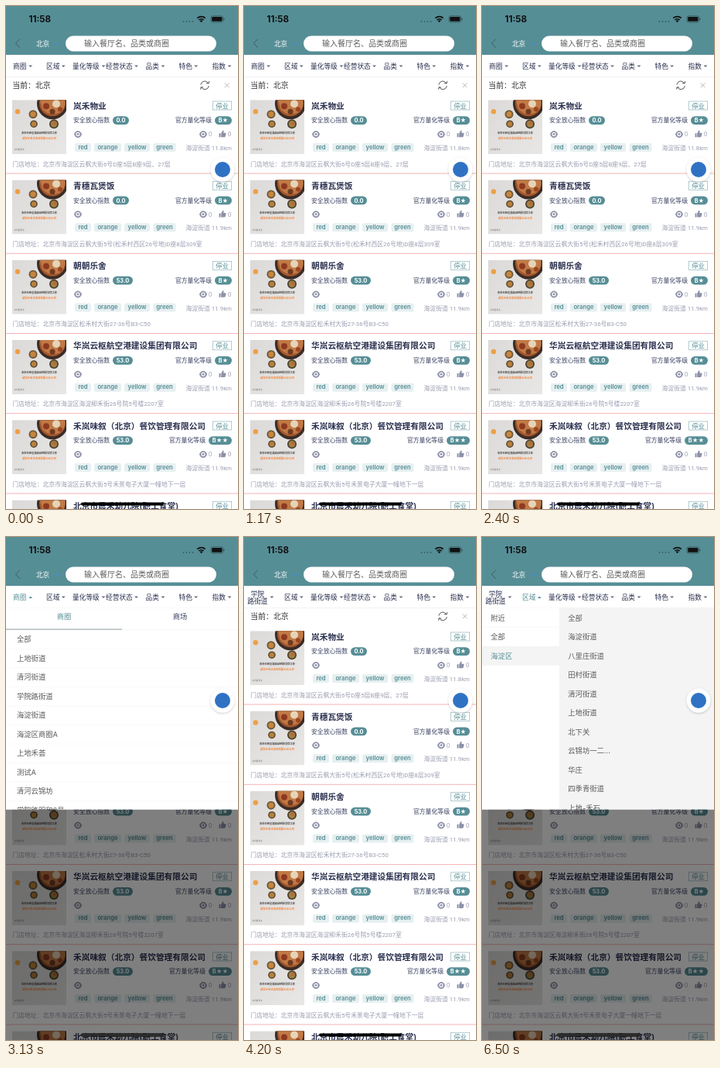
These frames come from a looping animation (300 by 649 pixels, 8 s). An HTML page:

```html
<!DOCTYPE html>
<html lang="zh-CN">
<head>
<meta charset="utf-8">
<title>餐厅列表</title>
<style>
  html, body { margin: 0; width: 100%; height: 100%; overflow: hidden; background: #fff; }
  #stage { display: block; width: 300px; height: 649px; }
  text { font-family: Inter, "Noto Sans CJK SC", "Noto Sans CJK", sans-serif; white-space: pre; }
  .r { font-family: Roboto, "Noto Sans CJK SC", "Noto Sans CJK", sans-serif; }
  .k { animation: 8s step-end infinite; opacity: 0; }
  .area { animation-name: area; }
  .first { animation-name: first; }
  .picked { animation-name: picked; }
  .before { animation-name: before; }
  .region { animation-name: region; }
  .street { animation-name: street; }
  .mask { animation-name: mask; }
  @keyframes first { 0% { opacity: 1 } 39.125%, 100% { opacity: 0 } }
  @keyframes area { 0% { opacity: 0 } 39.125% { opacity: 1 } 50.375%, 100% { opacity: 0 } }
  @keyframes picked { 0% { opacity: 0 } 50.375%, 100% { opacity: 1 } }
  @keyframes before { 0% { opacity: 1 } 70.375%, 100% { opacity: 0 } }
  @keyframes region { 0% { opacity: 0 } 70.375%, 100% { opacity: 1 } }
  @keyframes street { 0% { opacity: 0 } 79.125%, 100% { opacity: 1 } }
  @keyframes mask {
    0% { opacity: 0 } 39.125% { opacity: 1 } 50.375% { opacity: 0 } 70.375%, 100% { opacity: 1 }
  }
</style>
</head>
<body>
<svg id="stage" viewBox="0 0 300 649"></svg>
<script>
const TEAL = '#568e96', NAVY = '#2b3150', LABEL = '#3c4263', MUTED = '#9a9db0', ITEM = '#5a5a5a';

// Text placed by its vertical centre.
const text = (x, y, size, fill, str, o = {}) =>
  `<text x="${x}" y="${(y + size * .37).toFixed(2)}" font-size="${size}" fill="${fill}"` +
  ` font-weight="${o.w || 400}" text-anchor="${o.a || 'start'}" class="${o.c || ''}">${str}</text>`;
const rect = (x, y, w, h, fill, r = 0, more = '') =>
  `<rect x="${x}" y="${y}" width="${w}" height="${h}" rx="${r}" fill="${fill}" ${more}/>`;
const circle = (x, y, r, fill, more = '') => `<circle cx="${x}" cy="${y}" r="${r}" fill="${fill}" ${more}/>`;
const path = (d, fill, more = '') => `<path d="${d}" fill="${fill}" ${more}/>`;
const line = (d, stroke, w) => path(d, 'none', `stroke="${stroke}" stroke-width="${w}" stroke-linecap="round"`);
const group = (cls, ...kids) => `<g class="${cls}">${kids.join('')}</g>`;
const move = (x, y, body) => `<g transform="translate(${x} ${y})">${body}</g>`;
const caret = (x, y, fill, up) => path(`M${x - 2.4} ${y + (up ? 1.2 : -1.2)}h4.8l-2.4 ${up ? -2.5 : 2.5}z`, fill);

const eye = fill =>
  path('M-5 0C-3-6 3-6 5 0C3 6-3 6-5 0Z', fill) + circle(0, 0, 2.6, '#fff') + circle(0, 0, 1.4, fill);
const thumb = path('M-4.5-.8h2v5h-2zM-1.8-.8L.4-4.5q1.6 0 1.2 1.7l-.4 1.6h2.6q.9.2.7 1.2l-.9 3.4q-.3.8-1.1.8h-4.3z', '#8d91a8');

const photo = `<svg width="70" height="70">` +
  rect(0, 0, 70, 70, 'url(#paper)') +
  circle(52, 5, 20, '#3a2c26') + circle(52, 4, 17, '#a4562c') +
  path('M36 0h32q2 12-8 17q-14 4-21-6z', '#c07a45') +
  circle(44, 8, 4, '#8e3a22') + circle(57, 5, 5, '#e6d3b8') + circle(52, 15, 3.5, '#6f3a20') +
  circle(62, 12, 3, '#9b4526') +
  circle(27, 18.5, 5.5, '#6b5a3a') + circle(27, 18.5, 3.6, '#c7853c') +
  circle(54, 31, 6, '#4d4232') + circle(54, 31, 4.2, '#a1823f') + circle(55, 30, 2, '#c5603a') +
  circle(28, 31, 4.8, '#584a35') + circle(28, 31, 3.2, '#b98038') +
  circle(7, 15, 3.2, '#eda045') +
  text(35, 42.2, 3.3, '#444', '本市已经全面启动明厨餐饮工作', { w: 700, a: 'middle' }) +
  text(35, 49.3, 3.4, '#ef8238', '请餐厅业主实现后厨公众公开', { w: 700, a: 'middle' }) +
  text(2.5, 64.3, 2.7, '#777', '扫码看更多') + '</svg>';

const chips = [['red', 89, 21], ['orange', 114, 35], ['yellow', 153, 33], ['green', 190.5, 29]];

const shops = [
  ['岚禾物业', '0.0', 1, '11.8', '云枫大街6号D座5层B座9层、27层'],
  ['青穗瓦煲饭', '0.0', 1, '11.9', '云枫大街5号(松禾村西区26号地)D座8层309室'],
  ['朝朝乐舍', '53.0', 1, '11.9', '松禾村大街27-36号B3-C50'],
  ['华岚云枢航空港建设集团有限公司', '53.0', 1, '11.9', '海淀柳禾街26号院5号楼2207室'],
  ['禾岚味叙（北京）餐饮管理有限公司', '53.0', 2, '11.9', '云枫大街5号禾景电子大厦一幢地下一层'],
  ['北京市晨禾幼儿院(职工食堂)', '53.0', 1, '11.9', '海淀柳禾街9号']
];

function card([name, score, stars, km, street], i) {
  const scoreW = score.length > 3 ? 26 : 21, gradeX = stars > 1 ? 262 : 270;
  return move(0, 121.2 + 103.25 * i,
    move(8, 0, photo) +
    text(87, 7.4, 10.7, NAVY, name, { w: 600 }) +
    rect(267.3, 1.8, 24.4, 11, 'none', 0, 'stroke="#8fb6bb" stroke-width=".7"') +
    text(279.5, 7.3, 8.4, TEAL, '停业', { a: 'middle' }) +
    text(87, 26.4, 7.85, LABEL, '安全放心指数') +
    rect(138, 21, scoreW, 10.8, TEAL, 5.4) +
    text(138 + scoreW / 2, 26.4, 7.4, '#fff', score, { w: 700, a: 'middle' }) +
    text(gradeX - 4, 26.4, 7.85, LABEL, '官方量化等级', { a: 'end' }) +
    rect(gradeX, 21, 292 - gradeX, 10.8, TEAL, 5.4) +
    text((gradeX + 292) / 2, 26.4, 7.4, '#fff', 'B' + '★'.repeat(stars), { w: 700, a: 'middle' }) +
    move(93, 44.2, eye('#8d91a8')) + move(255, 44.2, eye('#8d91a8')) + move(280, 43.8, thumb) +
    text(261.8, 44.4, 7.4, MUTED, '0') + text(286.8, 44.4, 7.4, MUTED, '0') +
    chips.map(([s, x, w]) => rect(x, 55.8, w, 11, '#e7f0f1', 2) +
      text(x + w / 2, 60.6, 7.7, TEAL, s, { w: 600, a: 'middle' })).join('') +
    text(292, 62, 7.85, MUTED, `海淀街道 ${km}km`, { a: 'end', c: 'r' }) +
    text(8.3, 82.6, 7.85, MUTED, '门店地址：北京市海淀区' + street, { c: 'r' }) +
    rect(0, 94.4, 300, .8, '#f4a3a3'));
}

const header =
  rect(0, 0, 300, 63, TEAL) +
  text(29.5, 17, 11.6, '#111', '11:58', { w: 700 }) +
  [230, 234, 238, 242].map(x => circle(x - .5, 20, .8, '#2b474b')).join('') +
  path('M252.5 21.3l-2-2.2q2-1.7 4 0zM248.8 17.4q3.7-3 7.4 0l-1.1 1.1q-2.6-2-5.2 0zM246.7 15.1q5.8-4.8 11.6 0l-1.2 1.2q-4.6-3.6-9.2 0z', '#111') +
  rect(265, 12.8, 15.6, 8.2, 'none', 2.3, 'stroke="#2d4a4e" stroke-width=".7"') +
  rect(266.2, 14, 13.2, 5.8, '#111', 1.3) + rect(281.4, 15.5, 1, 2.8, '#2d4a4e', .5) +
  line('M17.5 43l-5 5.2l5 5.2', '#3b555a', .9) +
  text(39, 48.4, 8.6, '#fff', '北京') + path('M63 47.5h7l-3.5 3.4z', '#4b8fc4') +
  rect(77, 38.6, 195, 19.8, '#fff', 9.9) +
  text(101, 48.5, 10, '#5c5c5c', '输入餐厅名、品类或商圈');

const tab = (label, x, end, fill, up) => text(x, 77.8, 8.7, fill, label) + caret(end, 77.8, fill === TEAL ? TEAL : '#666b80', up);
const tabs =
  rect(0, 63, 300, 28.5, '#fff') + rect(0, 91, 300, .6, '#e9e9e9') +
  group('k first', tab('商圈', 9, 31.7, NAVY)) +
  group('k area', tab('商圈', 9, 31.7, TEAL, true)) +
  group('k picked', text(17.5, 73.4, 8.7, NAVY, '学院', { a: 'middle' }) +
    text(17.5, 83.2, 8.7, NAVY, '路街道', { a: 'middle' }) + caret(36, 77.8, '#666b80')) +
  group('k before', tab('区域', 52, 74.3, NAVY)) +
  group('k region', tab('区域', 52, 74.3, TEAL, true)) +
  [['量化等级', 86, 126], ['经营状态', 129, 168.5], ['品类', 180.5, 203], ['特色', 223.5, 245.7], ['指数', 266.5, 289]]
    .map(([s, x, e]) => tab(s, x, e, NAVY)).join('');

const place =
  text(8.3, 102.3, 9.9, '#333', '当前：北京') +
  line('M251.9 101.2a5.3 5.3 0 0 1 9.8-1.6M262.3 103.4a5.3 5.3 0 0 1-9.8 1.6M262.6 97.4l-.6 2.6l-2.6-.5M251.6 107.2l.6-2.6l2.6.5', '#444', .9) +
  line('M283 99.7l5.2 5.2M288.2 99.7l-5.2 5.2', '#999', .7);

const list = (x, y, w, items, rule) => items.map((s, i) =>
  text(x, y + 24.53 * i, 9.3, ITEM, s) + rect(x < 100 ? 0 : 100, y + 12.3 + 24.53 * i, w, .5, rule)).join('');
const panel = (cls, body) => `<svg class="k ${cls}" y="91.5" width="300" height="260" viewBox="0 91.5 300 260">${body}</svg>`;

const areaPanel = panel('area',
  rect(0, 91.5, 300, 260, '#fff') +
  text(75, 102.7, 9.3, TEAL, '商圈', { a: 'middle' }) + text(225, 102.7, 9.3, LABEL, '商场', { a: 'middle' }) +
  rect(0, 119, 300, .5, '#eee') + rect(0, 118.6, 150, 1, '#8c9ea6') +
  list(14, 131.8, 300, ['全部', '上地街道', '清河街道', '学院路街道', '海淀街道', '海淀区商圈A', '上地禾荟', '测试A', '清河云锦坊', '学院路明和6号'], '#f5f5f5'));

const regionPanel = panel('region',
  rect(0, 91.5, 100, 260, '#fff') + rect(100, 91.5, 200, 260, '#f4f4f4') +
  list(11.3, 104.2, 100, ['附近', '全部', '海淀区'], '#f2f2f2') +
  group('k street', rect(0, 141, 100, 24.5, '#f4f4f4') + text(11.3, 153.3, 9.3, TEAL, '海淀区') +
    list(111.3, 104.2, 200, ['全部', '海淀街道', '八里庄街道', '田村街道', '清河街道', '上地街道', '北下关', '云锦坊一二...', '华庄', '四季青街道', '上地-禾石'], '#f4f4f4')));

const button = circle(280, 211, 15.4, '#fff', 'filter="url(#soft)"') + circle(280, 211, 10, '#2f72c4');
const bar = fill => rect(97, 640.6, 107, 3.8, fill, 1.9);

document.getElementById('stage').innerHTML =
  `<defs>
    <linearGradient id="paper" x2="1" y2="1"><stop stop-color="#dcdad9"/><stop offset="1" stop-color="#e8e7e6"/></linearGradient>
    <filter id="soft" x="-30%" y="-30%" width="160%" height="160%"><feDropShadow dx="0" dy="1" stdDeviation="1.5" flood-opacity=".22"/></filter>
  </defs>` +
  rect(0, 0, 300, 649, '#fff') + shops.map(card).join('') + place + header + tabs + bar('#000') +
  group('k mask', rect(0, 351.5, 300, 297.5, 'rgba(0,0,0,.5)') + bar('#2c2c2c')) +
  areaPanel + regionPanel + button;
</script>
</body>
</html>
```
